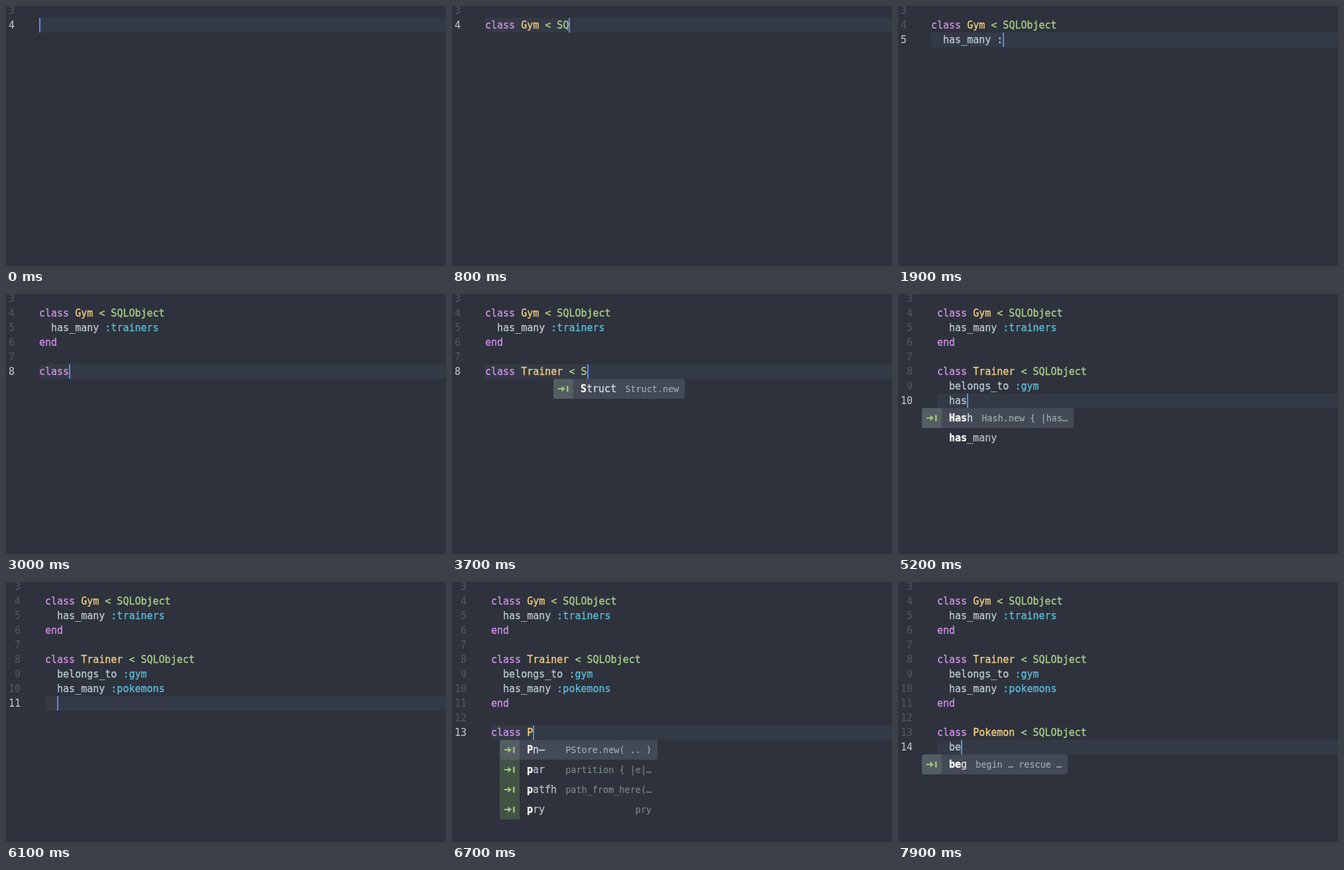
An HTML page that plays this animation: 664 by 392 pixels, repeating every 8000 ms.

```html
<!DOCTYPE html>
<html>
<head>
<meta charset="utf-8">
<style>
  html, body { margin: 0; width: 100%; height: 100%; overflow: hidden; background: #2e323c; }
  svg { display: block; }
  text { font: 15px "DejaVu Sans Mono", monospace; white-space: pre; color: #b8c6d0; }
  text, tspan { fill: currentColor; stroke: currentColor; stroke-width: .35px; }
  .number { color: #515762; stroke-width: .1px; }
  .number.on { color: #c0c4ca; }
  .keyword { color: #d08ee6; }
  .type { color: #f2cd80; }
  .parent { color: #a8cd8a; }
  .symbol { color: #5bbad8; }
  .item { color: #b3b8c0; }
  .on .item { color: #d8dce2; }
  .match { color: #fff; font-weight: bold; }
  .label { font-size: 13.5px; color: #7c8689; stroke-width: .15px; }
  .on .label { color: #a4abb2; }
</style>
</head>
<body>
<svg id="stage" width="664" height="392" viewBox="0 0 664 392"></svg>
<script>
const LOOP = 8000, STEP = 100, FIRST_LINE = 4, ROW = 22, CHAR = 9.03, ITEM = 30;
const stage = document.getElementById("stage");

const typed = [
  "class Gym < SQLObject", "has_many :trainers", "end", "",
  "class Trainer < SQLObject", "belongs_to :gym", "has_many :pokemons", "end", "",
  "class Pokemon < SQLObject", "be"
].join("\n");

// [time, characters typed], with steady typing in between
const pace = [[0, 0], [800, 14], [1900, 32], [2700, 46], [2800, 48], [3000, 51], [4300, 74],
  [5200, 91], [6700, 119], [7900, 140], [8000, 140]];

// Suggestions by typed prefix: [word, label]; words without a label get no icon
const classItems = [["cla", "class .. end"], ["clafn", "class_from_name…"], ["cls", "class << self"]];
const suggestions = {
  c: [...classItems, ["case", "case .. end"], ["cfy", "classify { |e|…"],
    ["col", "collect { |e| …"], ["cou", "count { |e| .. }"], ["cyc", "cycle { |e| .. }"]],
  cl: classItems,
  G: [["gre", "grep(/pattern/)…"], ["gsu", "gsub(/pattern/)…"]],
  Tr: [["tra", "transaction { …"], ["tri", "trim(string) .."], ["try", "try(:method) .."],
    ["true", "true"], ["trap", "trap(signal) { …"], ["trv", "traverse { |e|…"]],
  S: [["Struct", "Struct.new"]],
  P: [["Pn–", "PStore.new( .. )"], ["par", "partition { |e|…"],
    ["patfh", "path_from_here(…"], ["pry", "pry"]],
  g: [["gre", "grep(/pattern/)…"], ["gsu", "gsub(/pattern/)…"]],
  en: [["enc", "encoding: UTF-8"]],
  has: [["Hash", "Hash.new { |has…"], ["has_many"]],
  be: [["beg", "begin … rescue …"]]
};

const esc = s => s.replace(/&/g, "&amp;").replace(/</g, "&lt;");
const rect = (x, y, w, h, fill, rx = 0) =>
  `<rect x="${x}" y="${y}" width="${w}" height="${h}" rx="${rx}" fill="${fill}"/>`;
const text = (x, y, body, cls, anchor = "start") =>
  `<text x="${x}" y="${y}" class="${cls}" text-anchor="${anchor}">${body}</text>`;
const span = (body, cls) => `<tspan class="${cls}">${esc(body)}</tspan>`;

function charsAt(time) {
  const i = pace.findIndex(([t]) => t > time);
  const [t0, n0] = pace[i - 1], [t1, n1] = pace[i];
  return Math.floor(n0 + (n1 - n0) * (time - t0) / (t1 - t0) + 1e-6);
}

// Bodies of a class are indented; a finished "end" moves back to the margin
function indent(lines) {
  let inside = false;
  return lines.map(line => {
    if (line === "end") inside = false;
    const result = (inside ? "  " : "") + line;
    if (/^class /.test(line)) inside = true;
    return result;
  });
}

function highlight(line) {
  return line.replace(/:\w+|< ?\w*|\w+/g, token => {
    if (/^(class|end)$/.test(token)) return span(token, "keyword");
    if (token[0] === ":") return span(token, "symbol");
    if (token[0] === "<") return span(token, "parent");
    return /^[A-Z]/.test(token) ? span(token, "type") : token;
  });
}

function popup(prefix, wordX, top) {
  const items = suggestions[prefix];
  if (!items) return "";
  const left = wordX - 41;
  const longest = k => Math.max(...items.filter(i => i[1]).map(i => i[k].length));
  const width = 63 + CHAR * longest(0) + 8.13 * longest(1);
  return items.map(([word, label], i) => {
    const y = top + i * ITEM, on = i === 0;
    let out = on ? rect(left, y, width, ITEM, "#434955", 3) : "";
    if (label) {
      out += rect(left, y, 30, ITEM, on ? "#555d64" : "#415345", on ? 3 : 0);
      out += `<path transform="translate(${left} ${y})" fill="#9cc47c"
        d="M7 14h5.5v-3.5l5.5 4.5-5.5 4.5v-3.5h-5.5zM20 10.5h2.6v9h-2.6z"/>`;
      out += text(left + width - 9, y + 20, label, "label", "end");
    }
    const n = prefix.length;
    out += text(wordX, y + 20, span(word.slice(0, n), "match") + esc(word.slice(n)), "item");
    return `<g class="${on ? "on" : ""}">${out}</g>`;
  }).join("");
}

function draw(time) {
  const lines = indent(typed.slice(0, charsAt(time)).split("\n"));
  const last = lines.length - 1, current = lines[last];
  const margin = last + FIRST_LINE >= 10 ? 59 : 50;
  const top = i => 18 + i * ROW;
  const number = (i, cls) => text(margin - 37, top(i) + 16, i + FIRST_LINE, cls, "end");
  const word = (current.match(/\w+$/) || [""])[0];
  const wordX = margin + Math.round((current.length - word.length) * CHAR);
  const cursorX = margin + Math.round(current.length * CHAR);

  let out = rect(0, 0, 664, 392, "#2e323c");
  out += rect(margin, top(last), 664 - margin, ROW, "#343a45");
  out += number(-1, "number");
  lines.forEach((line, i) => {
    out += number(i, i === last ? "number on" : "number");
    out += text(margin, top(i) + 16, highlight(line), "code");
  });
  out += rect(cursorX, top(last), 2, ROW, "#578cf5");
  out += popup(word, wordX, top(last) + ROW);
  stage.innerHTML = out;
}

const start = performance.now();
let shown = -1;
function tick() {
  const step = Math.floor((performance.now() - start) % LOOP / STEP);
  if (step !== shown) draw((shown = step) * STEP);
  requestAnimationFrame(tick);
}
tick();
</script>
</body>
</html>
```
